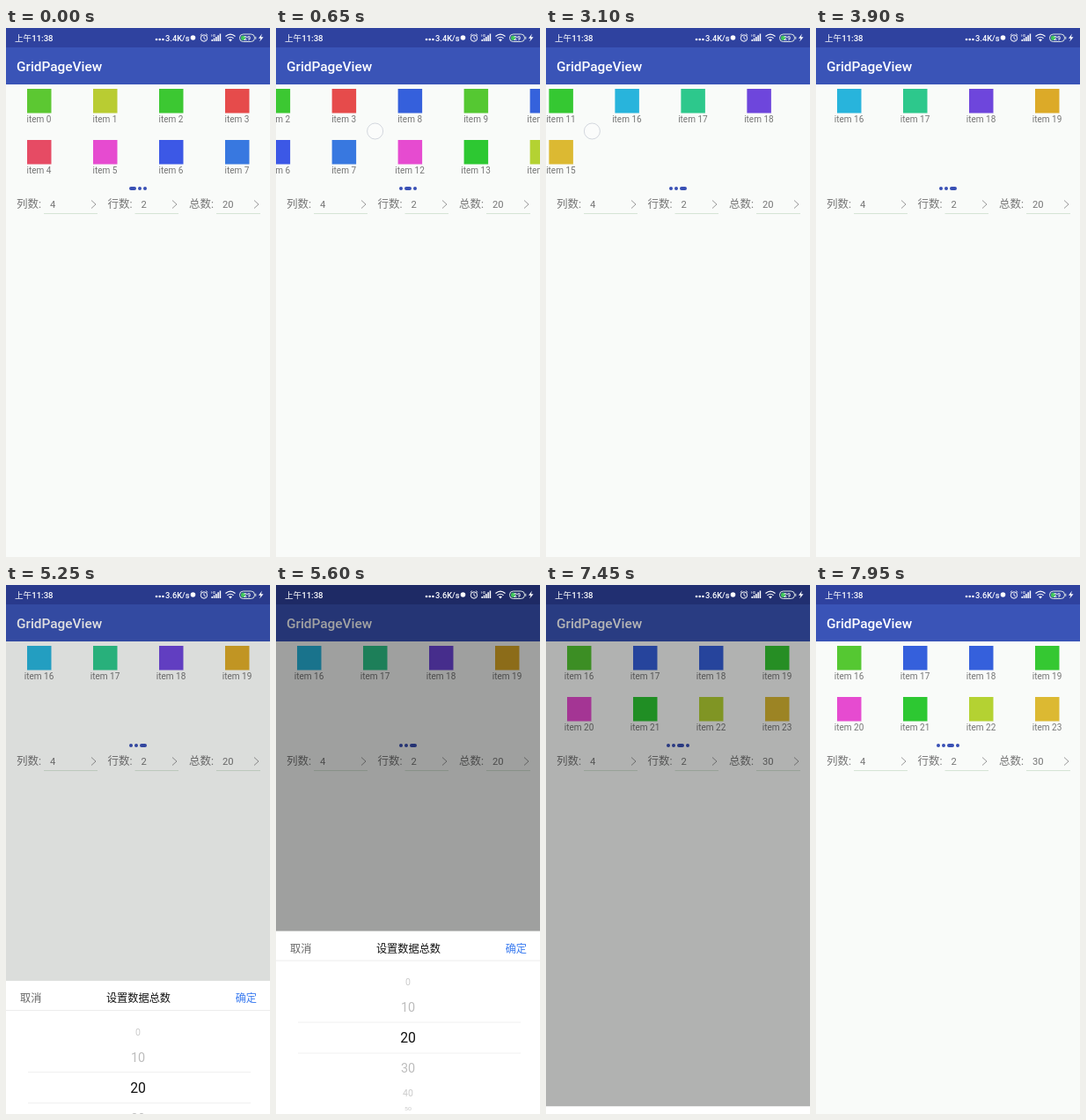
These frames come from a looping animation (300 px wide and 600 px high, 8000 ms). An HTML page:

```html
<!DOCTYPE html>
<html lang="zh-CN">
<head>
<meta charset="utf-8">
<title>GridPageView</title>
<style>
  html, body { margin: 0; width: 100%; height: 100%; overflow: hidden; background: #f9fbf9; }
  svg { display: block; width: 300px; height: 600px; }
  text { font-family: Roboto, "Noto Sans CJK SC", "Noto Sans CJK", sans-serif; }
</style>
</head>
<body>
<svg id="stage" viewBox="0 0 300 600" xmlns="http://www.w3.org/2000/svg"></svg>
<script>
const LOOP = 8000;
const stage = document.getElementById('stage');

function el(parent, tag, attrs = {}, content) {
  const node = document.createElementNS('http://www.w3.org/2000/svg', tag);
  for (const key in attrs) node.setAttribute(key, attrs[key]);
  if (content !== undefined) node.textContent = content;
  return parent.appendChild(node);
}
const group = (parent, attrs) => el(parent, 'g', attrs);
const rect = (parent, x, y, width, height, fill, rx = 0) =>
  el(parent, 'rect', { x, y, width, height, fill, rx });
const line = (parent, d, stroke, width = 1) =>
  el(parent, 'path', { d, stroke, 'stroke-width': width, fill: 'none' });
const text = (parent, x, y, size, fill, content, extra = {}) =>
  el(parent, 'text', { x, y, 'font-size': size, fill, ...extra }, content);
const middle = { 'text-anchor': 'middle' };
const show = (node, on) => node.setAttribute('visibility', on ? 'visible' : 'hidden');
const move = (node, x, y) => node.setAttribute('transform', `translate(${x} ${y})`);

const clamp = v => Math.min(1, Math.max(0, v));
const span = (t, from, length) => clamp((t - from) / length);
const smooth = p => p * p * (3 - 2 * p);
const easeOut = (p, power) => 1 - (1 - p) ** power;

// App screen
rect(stage, 0, 0, 300, 600, '#f9fbf9');
rect(stage, 0, 0, 300, 22, '#2f429f');
rect(stage, 0, 22, 300, 42, '#3a54b7');
text(stage, 12, 49, 15.4, '#fff', 'GridPageView', { 'font-weight': 500 });

const palettes = [
  ['#5cc832', '#b9cc32', '#3cc832', '#e64b4b', '#e64b64', '#e64bd0', '#3c58e6', '#3878e0'],
  ['#3560dc', '#55c832', '#3562dc', '#35c832', '#e64bd0', '#2dc832', '#b4d232', '#dcb932'],
  ['#28b4dc', '#2dc88c', '#6e46dc', '#dcaa28'],
  ['#55c832', '#3560dc', '#3560dc', '#35c832', '#e64bd0', '#2dc832', '#b4d232', '#dcb932']
];

const strip = group(stage);
function addPage(pageIndex, colors) {
  const page = group(strip, { transform: `translate(${pageIndex * 300} 0)` });
  colors.forEach((color, i) => {
    const cx = 37.5 + (i % 4) * 75;
    const y = 69 + Math.floor(i / 4) * 58;
    rect(page, cx - 13.5, y, 27.5, 27.5, color);
    text(page, cx, y + 38, 10, '#757575', `item ${pageIndex * 8 + i}`, middle);
  });
  return page;
}
addPage(0, palettes[0]);
addPage(1, palettes[1]);
const shortPage = addPage(2, palettes[2]);
const fullPage = addPage(2, palettes[3]);

const dots = Array.from({ length: 4 }, () => rect(stage, 0, 180, 4, 4, '#3950b5', 2));
function drawDots(count, active) {
  let x = 150 - (6 * count + 2) / 2;
  dots.forEach((dot, i) => {
    const width = i === active ? 8 : 4;
    show(dot, i < count);
    dot.setAttribute('x', x);
    dot.setAttribute('width', width);
    x += width + 2;
  });
}

function addField(x, label, value, end) {
  text(stage, x, 204, 12.5, '#757575', label);
  line(stage, `M${x + 31} 210.5H${end}`, '#d6e4d6');
  line(stage, `M${end - 7} 195.5l5 4.5l-5 4.5`, '#9a9a9a');
  return text(stage, x + 38, 204, 11.2, '#757575', value);
}
addField(12, '列数:', '4', 104);
addField(115.5, '行数:', '2', 196);
const total = addField(208, '总数:', '20', 289);

const dim = rect(stage, 0, 0, 300, 600, '#000');

// Status icons stay bright above the dim layer
text(stage, 10, 15, 9.6, '#fff', '上午11:38', { 'font-weight': 500 });
[171, 174.7, 178.4].forEach(cx => el(stage, 'circle', { cx, cy: 13, r: 1.3, fill: '#fff' }));
const speed = text(stage, 181, 14.5, 9.3, '#fff', '3.4K/s', { 'font-weight': 500 });
el(stage, 'circle', { cx: 212.5, cy: 11, r: 2.8, fill: '#fff' });
el(stage, 'circle', { cx: 225, cy: 11.5, r: 3.7, fill: 'none', stroke: '#fff' });
line(stage, 'M225 9.3V11.8L226.8 12.8M220.8 8.4l2-1.8M229.2 8.4l-2-1.8', '#fff', 0.9);
text(stage, 233, 9.5, 4, '#fff', 'HD');
[2, 3.5, 5, 6.8, 8.5].forEach((h, i) => rect(stage, 233.5 + i * 2.3, 15 - h, 1.5, h, '#fff'));
line(stage, 'M249.5 9.5Q255 4.8 260.5 9.5M251.5 11.7Q255 8.8 258.5 11.7', '#fff', 1.2);
el(stage, 'path', { d: 'M253 13.2Q255 11.6 257 13.2L255 15.5Z', fill: '#fff' });
el(stage, 'rect', { x: 265.5, y: 7, width: 17, height: 8.5, rx: 4, fill: 'none', stroke: '#dfe8e4' });
rect(stage, 267, 8.4, 5, 5.7, '#3fc85a', 2.5);
rect(stage, 283.3, 9.8, 1, 3, '#dfe8e4');
text(stage, 274, 14, 7.2, '#fff', '29', { ...middle, 'font-weight': 500 });
el(stage, 'path', { d: 'M291 6.5L287 11.7H289.5L288.2 15.5L292.5 10.2H289.8Z', fill: '#fff' });

// Bottom sheet with number wheel
const RADIUS = 84.5, STEP = 24.1 * Math.PI / 180, SHEET = 209;
const sheet = group(stage);
rect(sheet, 0, 0, 300, SHEET + 2, '#fff');
text(sheet, 16, 24, 12.2, '#666', '取消');
text(sheet, 150.5, 24, 12.2, '#111', '设置数据总数', middle);
text(sheet, 285, 24, 12.2, '#3b7cf0', '确定', { 'text-anchor': 'end' });
line(sheet, 'M0 33.5H300', '#ececec');
line(sheet, 'M25 103.5H278M25 138.5H278', '#f0f0f0');
const clip = el(el(stage, 'defs'), 'clipPath', { id: 'wheelArea' });
rect(clip, 0, 34, 300, 175, '#000');
const wheel = group(sheet, { 'clip-path': 'url(#wheelArea)' });
const numbers = Array.from({ length: 10 }, (_, i) =>
  text(wheel, 0, 5.6, 15.8, '#111', i * 10, middle));

function drawWheel(position) {
  numbers.forEach((node, i) => {
    const gap = i - position;
    const angle = gap * STEP;
    const scale = Math.cos(angle);
    const visible = Math.abs(gap) < 3.5;
    show(node, visible);
    if (!visible) return;
    const far = Math.abs(gap);
    node.setAttribute('fill', far < 0.5 ? '#111' : far < 1.5 ? '#bdbdbd' : '#cacaca');
    node.setAttribute('transform',
      `translate(150 ${121 + RADIUS * Math.sin(angle)}) scale(${Math.max(scale, 0.45)} ${scale})`);
  });
}

const finger = el(stage, 'circle', {
  r: 9, fill: '#fff', 'fill-opacity': 0.4, stroke: '#8a93a8', 'stroke-opacity': 0.35
});

// A drag follows the finger, then the page snaps into place
const DRAG = 850, REACH = 248;
function swipe(t, start) {
  const drag = REACH * smooth(span(t, start, DRAG));
  return drag + (300 - REACH) * easeOut(span(t, start + DRAG, 750), 3);
}

const SWIPES = [80, 2300];
const OPEN = 5053, SCROLL = 6030, CLOSE = 7040;

function fingerAt(t) {
  for (const start of SWIPES) {
    if (t > start + 20 && t < start + DRAG) return [298 - swipe(t, start), 117];
  }
  if (t >= SCROLL + 20 && t < SCROLL + 450) return [160, 550 - 45 * smooth(span(t, SCROLL, 700))];
  if (t >= 6880 && t < CLOSE) return [275, 407];
  return null;
}

function draw(t) {
  const scroll = swipe(t, SWIPES[0]) + swipe(t, SWIPES[1]);
  const updated = t >= CLOSE;
  move(strip, -scroll, 0);
  show(shortPage, !updated);
  show(fullPage, updated);
  drawDots(updated ? 4 : 3, Math.round(scroll / 300));
  total.textContent = updated ? '30' : '20';
  speed.textContent = t < 4550 ? '3.4K/s' : '3.6K/s';

  dim.setAttribute('opacity', 0.56 * (span(t, 5080, 800) - span(t, CLOSE, 850)));
  const raised = easeOut(span(t, OPEN, 875), 5) - easeOut(span(t, CLOSE, 875), 5);
  move(sheet, 0, 600 - SHEET * raised);
  show(sheet, raised > 0);
  if (raised > 0) drawWheel(2 + smooth(span(t, SCROLL, 800)));
  else numbers.forEach(node => show(node, false));

  const touch = fingerAt(t);
  show(finger, touch);
  if (touch) move(finger, ...touch);
}

function tick(now) {
  draw(now % LOOP);
  requestAnimationFrame(tick);
}
draw(0);
requestAnimationFrame(tick);
</script>
</body>
</html>
```
